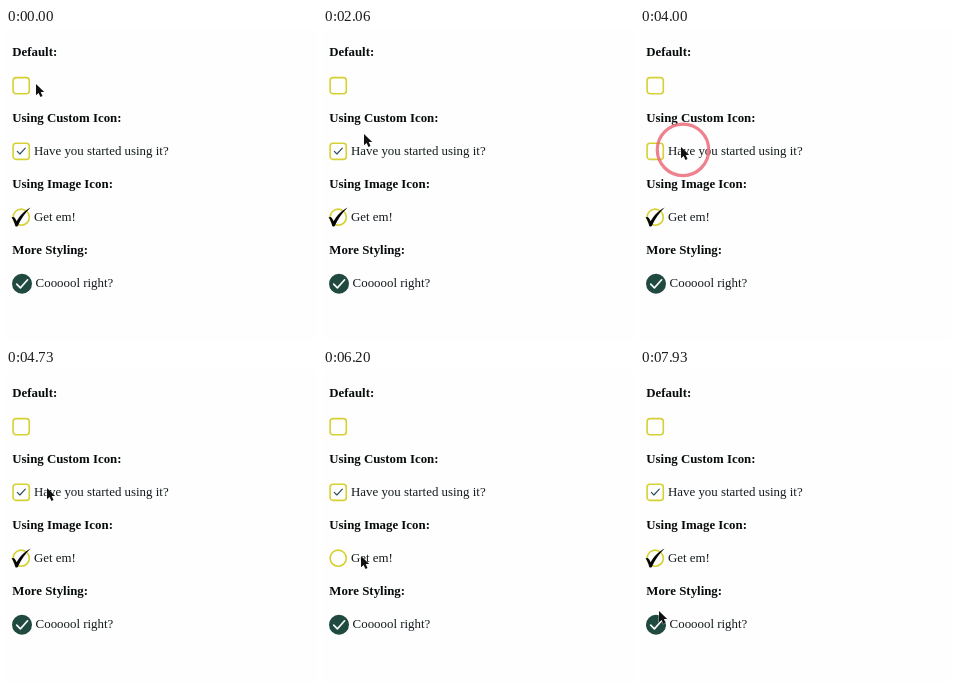
An HTML page that plays this animation: 311 by 313 pixels, repeating every 8 s.

```html
<!DOCTYPE html>
<html lang="en">
<head>
<meta charset="utf-8">
<title>Checkbox styles</title>
<style>
  html, body { margin: 0; width: 100%; height: 100%; overflow: hidden; background: #fdfefd; }
  svg { display: block; width: 100%; height: 100%; }
  text { font: 12.9px "Liberation Serif", serif; fill: #151b1e; }
  .head { font-weight: bold; font-size: 12.85px; fill: #080c0d; }
  .box { fill: #fefefc; stroke: #d6d034; stroke-width: 1.6; }
  .tick { fill: none; stroke-linecap: round; stroke-linejoin: round; }
</style>
</head>
<body>
<svg viewBox="0 0 311 313">
  <text class="head" x="6.3" y="28">Default:</text>
  <text class="head" x="6.3" y="94">Using Custom Icon:</text>
  <text class="head" x="6.3" y="160">Using Image Icon:</text>
  <text class="head" x="6.3" y="226">More Styling:</text>
  <text x="28" y="127">Have you started using it?</text>
  <text x="28" y="193">Get em!</text>
  <text x="29.6" y="259.3">Coooool right?</text>

  <rect class="box" x="7.1" y="49.6" width="16.2" height="16.2" rx="3"/>
  <rect class="box" x="7.1" y="115.2" width="16.2" height="16.2" rx="3"/>
  <path id="custom" class="tick" d="M11.3 123.4l2.6 2.6 5.4-5.8" stroke="#2c4c66" stroke-width="1.15"/>
  <circle class="box" cx="15.2" cy="189.2" r="8.1"/>
  <path id="image" fill="#050505" d="M5.5 189.6C7.3 188 9 189.2 10.7 193.2 13.5 188.2 18.5 182.5 24.6 179.6 19 185.2 14.8 191.2 11.8 197.9 10.2 199 9.5 198.6 9 197 8 193.5 7 191 5.5 189.6Z"/>
  <circle cx="16" cy="255.8" r="10" fill="#20493f"/>
  <path class="tick" d="M10.7 256.2l3.7 3.7 7.2-8.1" stroke="#f4faf6" stroke-width="1.7"/>

  <circle id="ring" fill="none" stroke="#eb6b7a" stroke-width="3.2" stroke-opacity=".85"/>
  <path id="cursor" d="M0 0V11.2L2.6 8.9 4.5 13 6.5 12.1 4.7 8.1H8.2Z" fill="#111" stroke="#fff" stroke-width=".8" stroke-opacity=".85" paint-order="stroke"/>
</svg>
<script>
const LOOP = 8000;
const [custom, image, ring, cursor] =
  ["custom", "image", "ring", "cursor"].map(id => document.getElementById(id));

// time, x, y of the pointer tip
const path = [
  [0, 30, 56], [1460, 30, 56], [2060, 41, 106], [2330, 41, 119],
  [4760, 41, 119], [5330, 40, 183], [5800, 38, 187], [6400, 38, 187],
  [7100, 16, 194], [7360, 16, 194], [7930, 19, 242]
];
// start, how long the ring shows
const customClicks = [[2600, 60], [3330, 130], [4000, 60], [4600, 130]];
const imageClicks = [[5930, 130], [7200, 130]];
const clicks = [...customClicks, ...imageClicks];

const ease = p => p * p * (3 - 2 * p);
const show = (el, on) => el.setAttribute("visibility", on ? "visible" : "hidden");
const checked = (list, t) => list.filter(c => t >= c[0]).length % 2 === 0;

function pointer(t) {
  const i = path.findIndex(k => k[0] > t);
  if (i < 0) return path[path.length - 1].slice(1);
  const [t0, x0, y0] = path[i - 1], [t1, x1, y1] = path[i];
  const p = ease((t - t0) / (t1 - t0));
  return [x0 + (x1 - x0) * p, y0 + (y1 - y0) * p];
}

function draw(t) {
  const [x, y] = pointer(t);
  cursor.setAttribute("transform", `translate(${x} ${y})`);
  show(custom, checked(customClicks, t));
  show(image, checked(imageClicks, t));

  const click = clicks.find(([start, hold]) => t >= start && t < start + hold);
  show(ring, click);
  if (click) {
    ring.setAttribute("cx", x + 2);
    ring.setAttribute("cy", y + 2.8);
    ring.setAttribute("r", 25.8 - 3.5 * Math.min(1, (t - click[0]) / 60));
  }
}

const begin = performance.now();
function tick() {
  draw((performance.now() - begin) % LOOP);
  requestAnimationFrame(tick);
}
tick();
</script>
</body>
</html>
```
